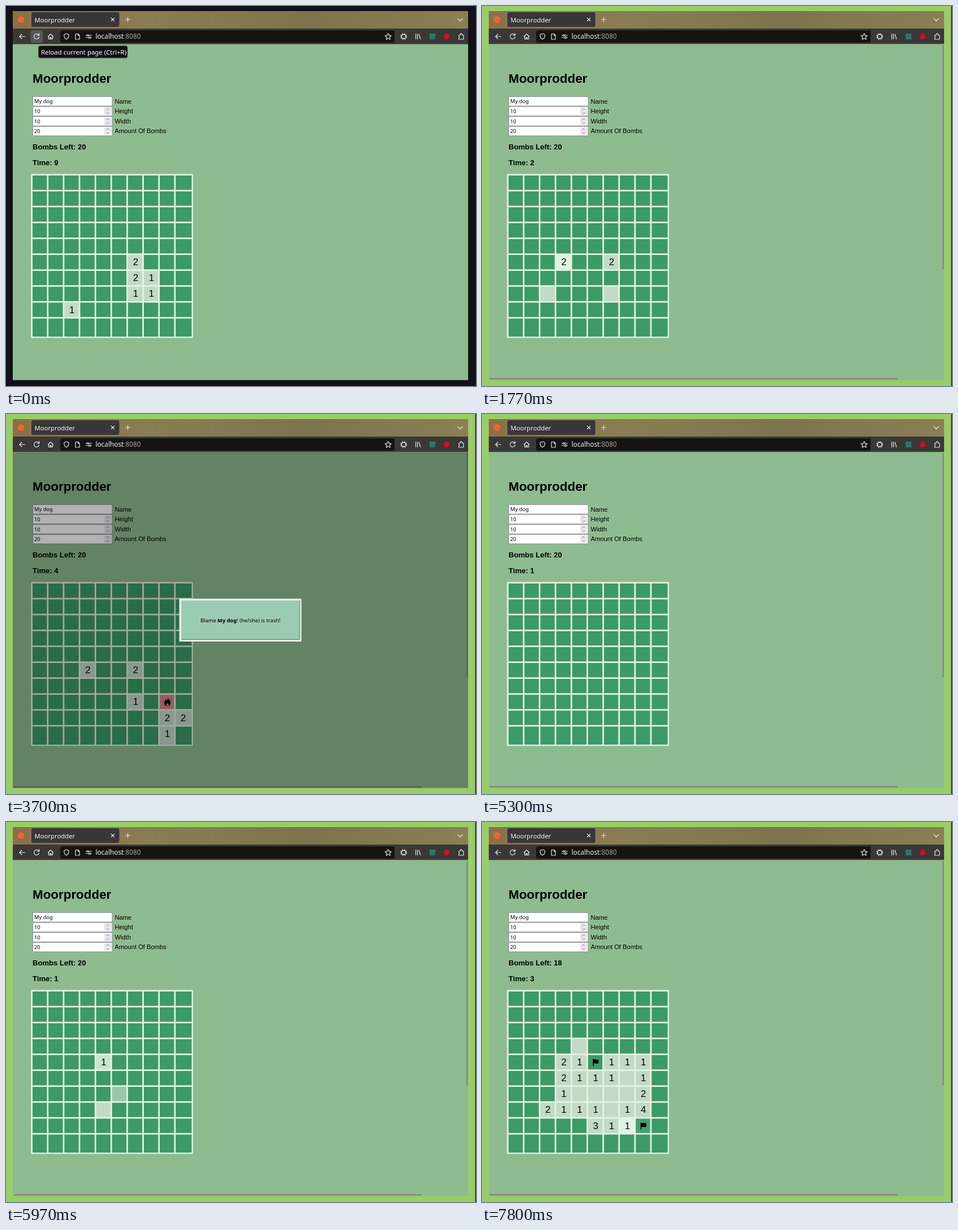
Recreate the animation shown at these times as an HTML page. Size 832 by 673 pixels, loop 8000 ms.

```html
<!DOCTYPE html>
<html lang="en">
<head>
<meta charset="utf-8">
<title>Moorprodder</title>
<style>
html, body { margin: 0; width: 100%; height: 100%; overflow: hidden; background: #121117; }
svg { display: block; width: 100vw; height: 100vh; }
.page { font: 11.2px "Liberation Sans", Arial, sans-serif; }
.ui { font-family: "Noto Sans", sans-serif; }
.digit { font-size: 16.8px; text-anchor: middle; }
.line { fill: none; stroke: #e8e6e3; stroke-width: 1.2; stroke-linecap: round; stroke-linejoin: round; }
.twig { fill: none; stroke: #4b3a2b; stroke-linecap: round; }
.dark { stroke: #252a2d; }
</style>
</head>
<body>
<svg id="stage" viewBox="0 0 832 673" preserveAspectRatio="none"></svg>
<script>
const LOOP = 8000, RELOADS = [170, 5300];
const stage = document.getElementById('stage');
const rect = (x, y, w, h, fill, more = '') =>
  `<rect x="${x}" y="${y}" width="${w}" height="${h}" fill="${fill}" ${more}/>`;
const text = (x, y, s, more = '') => `<text x="${x}" y="${y}" ${more}>${s}</text>`;
const line = (d, more = '') => `<path class="line" d="${d}" ${more}/>`;
const twig = (d, w, tone = '') => `<path class="twig ${tone}" d="${d}" stroke-width="${w}"/>`;

function field(i, value, label) {
  const y = 160 + i * 17.6;
  const spin = i ? rect(173.5, y + 2, 13, 13.5, '#e9e9ed', 'rx="1"') +
    line(`M177.5 ${y + 6.5}l2.5-2.5 2.5 2.5M177.5 ${y + 11}l2.5 2.5 2.5-2.5`,
      'style="stroke:#77777f;stroke-width:.9"') : '';
  return rect(47.5, y + .5, 140.5, 16.6, '#fff', 'stroke="#8f8f9d"') + spin +
    text(50, y + 12.3, value, 'class="ui" font-size="9.33"') + text(192.5, y + 12.5, label);
}

function toolbar() {
  return rect(12, 9, 806, 31, 'url(#bar)') +
    '<circle cx="26.5" cy="24" r="6" fill="#f0642e"/>' +
    rect(41.5, 12, 1, 25, '#a08c5c', 'opacity=".5"') +
    rect(45, 11, 155.5, 26, '#38363a', 'rx="3"') +
    text(50.5, 28.5, 'Moorprodder', 'font-size="11.3"') +
    line('M186.5 21.5l5 5m0-5l-5 5M211.5 24h8m-4-4v8M800 22.5l4 4 4-4') +
    rect(12, 40, 806, 27.5, '#3a3836') +
    rect(44, 43, 21, 22, '#5a5858', 'id="reloadHover" rx="3"') +
    rect(96, 43, 592, 22, '#151413', 'rx="3"') +
    line('M33.5 54h-9.5m4-4l-4 4 4 4') +
    line('M58 51.5a4.5 4.5 0 1 0 .6 3.5M58.6 48.5v3.5h-3.5') +
    line('M74.5 54l4.5-4.5 4.5 4.5M75.5 53.5v5h7v-5M78 58.5v-3h2v3') +
    line('M107 49l4 1.2v3.3q0 3.5-4 5.5-4-2-4-5.5v-3.3z') +
    line('M123 49.5h4.5l2.5 2.5v7h-7zM127.5 49.5v2.5h2.5') +
    line('M141.5 52h2m3 0h5M141.5 56h5m3 0h2') +
    '<circle class="line" cx="145" cy="52" r="1.5"/><circle class="line" cx="148" cy="56" r="1.5"/>' +
    text(158.5, 58.3, 'localhost<tspan fill="#a5a29c">:8080</tspan>', 'font-size="11.8"') +
    line('M676.5 48.5l1.7 3.6 3.8.5-2.8 2.7.7 3.9-3.4-1.9-3.4 1.9.7-3.9-2.8-2.7 3.8-.5z') +
    '<circle class="line" cx="704" cy="54" r="3.7"/><circle class="line" cx="704" cy="54" r="5" stroke-dasharray="2 1.93"/>' +
    line('M725.5 49.5v9M728.5 49.5v9M731 50l2.7 8.5') +
    rect(750, 49, 10, 10, '#28786c') +
    '<circle cx="780" cy="54" r="5" fill="#d90b1c"/>' +
    line('M801.5 51.5h2.7q-.5-3 1.5-3t1.5 3h2.7v7.5h-8.4v-2.5q2.3-.5 0-2.8z');
}

function wallpaper() {
  let seed = 11;
  const rnd = () => (seed = seed * 16807 % 2147483647) / 2147483647;
  const tones = ['#cfb473', '#a9a577', '#c0a566', '#adab7e', '#b5ae7d'];
  let blobs = '';
  for (let i = 0; i < 110; i++) {
    const x = rnd() * 832, y = rnd() * 125, rx = 8 + rnd() * 26;
    blobs += `<ellipse cx="${x}" cy="${y}" rx="${rx}" ry="${rx * .4}" fill="${tones[i % 5]}"
      opacity=".45" transform="rotate(${rnd() * 50 - 25} ${x} ${y})"/>`;
  }
  return rect(0, 0, 832, 130, 'url(#paper)') + `<g filter="url(#soft)">${blobs}` +
    '<path d="M0 0h125l-8 28-45 10-30 28-42 8zM465 52l42-4 25 28-45-6-36 2zM680 40l25 8 12 32-30-14z" fill="#d6b877" opacity=".8"/></g>' +
    twig('M341 0q-7 28-3 50l-4 63', 3) +
    twig('M337 42q-8-4-20-17t-43-15M306 20l-3-10M339 12l8-10', 1.7) +
    twig('M809 0q4 40 0 60l-2 50', 2) +
    twig('M566 112q-2-22 1-40M566 70q-6-18-28-23M568 76q20-4 36 3l1 28M562 84q-30 0-46 18M570 86q18 8 28 24M560 95l-26 9', 1.9, 'dark') +
    twig('M561 68l9 12M538 79l8 1', 6, 'dark') + twig('M723 86l-9 18M721 95l-9 2', 2, 'dark');
}

const PITCH = 28.15;
function cell(r, c) {
  const x = 47 + c * PITCH, y = 300.2 + r * PITCH, id = `${r}${c}`;
  return rect(x, y, c < 9 ? 25.4 : 28.3, r < 9 ? 25.4 : 32, '#3c9a66', `id="c${id}"`) +
    text(x + 13.4, y + 18.2, '', `id="d${id}" class="digit"`) +
    `<path id="i${id}" transform="translate(${x + 13.5} ${y + 13})" fill-rule="evenodd"/>`;
}
let cells = '';
for (let r = 0; r < 10; r++) for (let c = 0; c < 10; c++) cells += cell(r, c);

stage.innerHTML = `
<defs>
  <linearGradient id="bar"><stop stop-color="#8a7048"/><stop offset=".3" stop-color="#8a7d52"/>
    <stop offset=".65" stop-color="#7c744d"/><stop offset="1" stop-color="#8b7f54"/></linearGradient>
  <linearGradient id="paper"><stop stop-color="#c2a96c"/><stop offset=".35" stop-color="#b7aa74"/>
    <stop offset=".6" stop-color="#b2ad7c"/><stop offset="1" stop-color="#b5ab78"/></linearGradient>
  <filter id="soft"><feGaussianBlur stdDeviation="2.5"/></filter>
  <clipPath id="tear"><rect id="tearRect" width="832" height="0"/></clipPath>
</defs>
${rect(0, 0, 832, 673, '#98cd67', 'id="frame"')}
${rect(830.6, 0, 1.4, 673, '#1b1d18')}
<g class="ui" fill="#f4f2ee">${toolbar()}</g>
${rect(12, 67.5, 806, 595, '#8fbb90')}
<g class="page">
  ${text(47, 136.3, 'Moorprodder', 'font-size="22.4" font-weight="700"')}
  ${field(0, 'My dog', 'Name')}${field(1, '10', 'Height')}${field(2, '10', 'Width')}${field(3, '20', 'Amount Of Bombs')}
  <g font-size="13.1" font-weight="700">${text(47, 254, '', 'id="bombs"')}${text(47, 282, '', 'id="time"')}</g>
  ${rect(44.3, 297.5, 286.7, 290.3, '#e3f4e2')}${cells}
</g>
<g id="scroll">${rect(815, 69, 2.4, 397, '#828489')}${rect(13.5, 659.2, 721.5, 2.3, '#828489')}</g>
<g id="dialog">
  ${rect(12, 67.5, 806, 595, '#000', 'opacity=".3"')}
  ${rect(306.7, 327, 216.3, 76, '#e6f4e5')}${rect(310, 330.3, 210, 69.5, '#9ccbb4')}
  <path d="M310.5 399.3h209.3v-69" fill="none" stroke="#68957f" stroke-width="1.4"/>
  <path d="M310.7 399v-68.400h209" fill="none" stroke="#b4dac6"/>
  ${text(415, 369, 'Blame <tspan font-weight="700">My dog</tspan>! (he/she) is trash!', 'class="ui" font-size="9.33" text-anchor="middle"')}
</g>
<g id="tooltip" class="ui">
  ${rect(57.5, 70.5, 157.5, 21.5, '#111014', 'rx="3" stroke="#4b5a4b"')}
  ${text(62, 85.7, 'Reload current page (Ctrl+R)', 'font-size="11.4" fill="#fff"')}
</g>
<g clip-path="url(#tear)">${wallpaper()}</g>`;

// [from, to, row-column-value entries]; F is a flag, B a bomb, _ an empty cell
const REVEALS = [
  [0, 170, '562 662 671 761 771 821'],
  [1770, 5300, '532 562'], [1900, 5300, '761'], [2400, 5300, '981'],
  [3270, 5300, '882'], [3500, 5300, '892'], [3700, 5300, '78B'],
  [5900, LOOP, '441'], [6130, LOOP, '741'],
  [6230, LOOP, '532 541 551 561 461 471 481 581 682 784 771 871 861 853 751 731 631 64_ 65_ 66_ 67_ 57_ 76_'],
  [6700, LOOP, '45F'], [6970, LOOP, '432'], [7330, LOOP, '722'], [7700, LOOP, '88F'],
];
// [from, to, cells the pointer crosses in that time]
const HOVERS = [
  [560, 760, '02 12 22 32 43'], [760, 1770, '53'],
  [1740, 1880, '72'], [1740, 1900, '76'], [2040, 2400, '98'], [2870, 3270, '88'], [2960, 3500, '89'],
  [3500, 3700, '78'], [5395, 5435, '38'], [5435, 5530, '39'], [5530, 5770, '38 37 46 45'],
  [5770, 5900, '44'], [5900, 5935, '65'], [5935, 6130, '74'], [6130, 6230, '65'],
  [6600, 6690, '45'], [6860, 6970, '43'], [7200, 7330, '72'],
  [7340, LOOP, '34'], [7440, 7690, '88'], [7720, LOOP, '87'],
].flatMap(([from, to, list]) => {
  const ids = list.split(' '), step = (to - from) / ids.length;
  return ids.map((id, i) => [from + i * step, from + (i + 1) * step, id]);
});
// [from, to, height]: the desktop flashes through the top of the screen
const TEARS = [[400, 430, 75], [1930, 1960, 94], [2430, 2460, 75], [5470, 5530, 113], [6200, 6230, 94], [7470, 7500, 75]];
const TIMES = [[0, 9], [170, 1], [1770, 2], [2600, 3], [3270, 4], [5300, 1], [6230, 2], [7230, 3]];
const BOMBS = [[0, 20], [6700, 19], [7700, 18]];
const ICONS = {
  F: 'M-5-6h1.5v1c3-1.2 5 1 8.5-.3v7c-3.5 1.4-5.5-1-8.5 0v4.3h-1.5z',
  B: 'M-.5-7.5c4 3 6.3 5.5 6 9a5.5 5.5 0 0 1-11 0c0-3 2-4.2 2.6-6.5 1.2.8 1.9 2 2 3C.7-4 .6-6-.5-7.5zM.3 1c-1 2-2.3 2-2.3 3.4a2.2 2.2 0 0 0 4.4 0c0-1.4-1.7-1.9-2.1-3.4z',
};
const HIDDEN = [60, 154, 102], OPEN = [194, 218, 199], BRIGHT = [223, 243, 225], BURNT = [213, 131, 140];

const $ = id => document.getElementById(id);
const clamp = v => Math.max(0, Math.min(1, v));
const latest = (steps, t) => steps.filter(s => s[0] <= t).pop()[1];
const mix = (a, b, k) => `rgb(${a.map((v, i) => Math.round(v + (b[i] - v) * k))})`;
const show = (id, on) => $(id).setAttribute('visibility', on ? 'visible' : 'hidden');

function drawCells(t) {
  const open = {}, glow = {};
  for (const [from, to, list] of REVEALS)
    if (t >= from && t < to) for (const e of list.split(' ')) open[e.slice(0, 2)] = e[2];
  for (const [from, to, id] of HOVERS) {
    const k = clamp((t - from) / 30) * clamp(1 - (t - to) / 120);
    glow[id] = Math.max(glow[id] || 0, k);
  }
  for (let n = 0; n < 100; n++) {
    const id = String(n).padStart(2, '0'), v = open[id], icon = ICONS[v];
    const base = v === 'B' ? BURNT : v && v !== 'F' ? OPEN : HIDDEN;
    const lit = base === HIDDEN ? OPEN : base === OPEN ? BRIGHT : base;
    $('c' + id).setAttribute('fill', mix(base, lit, glow[id] || 0));
    $('d' + id).textContent = v && !icon && v !== '_' ? v : '';
    $('i' + id).setAttribute('d', icon || '');
  }
}

function render(t) {
  const reloading = t < RELOADS[0];
  const tear = TEARS.find(([from, to]) => t >= from && t < to);
  show('tooltip', reloading);
  show('reloadHover', reloading);
  show('scroll', !reloading);
  show('dialog', t >= 3700 && t < RELOADS[1]);
  $('frame').setAttribute('fill', reloading ? '#121117' : '#98cd67');
  $('time').textContent = 'Time: ' + latest(TIMES, t);
  $('bombs').textContent = 'Bombs Left: ' + latest(BOMBS, t);
  $('tearRect').setAttribute('height', tear ? tear[2] : 0);
  drawCells(t);
}

const begin = performance.now();
function tick() {
  render((performance.now() - begin) % LOOP);
  requestAnimationFrame(tick);
}
tick();
</script>
</body>
</html>
```
